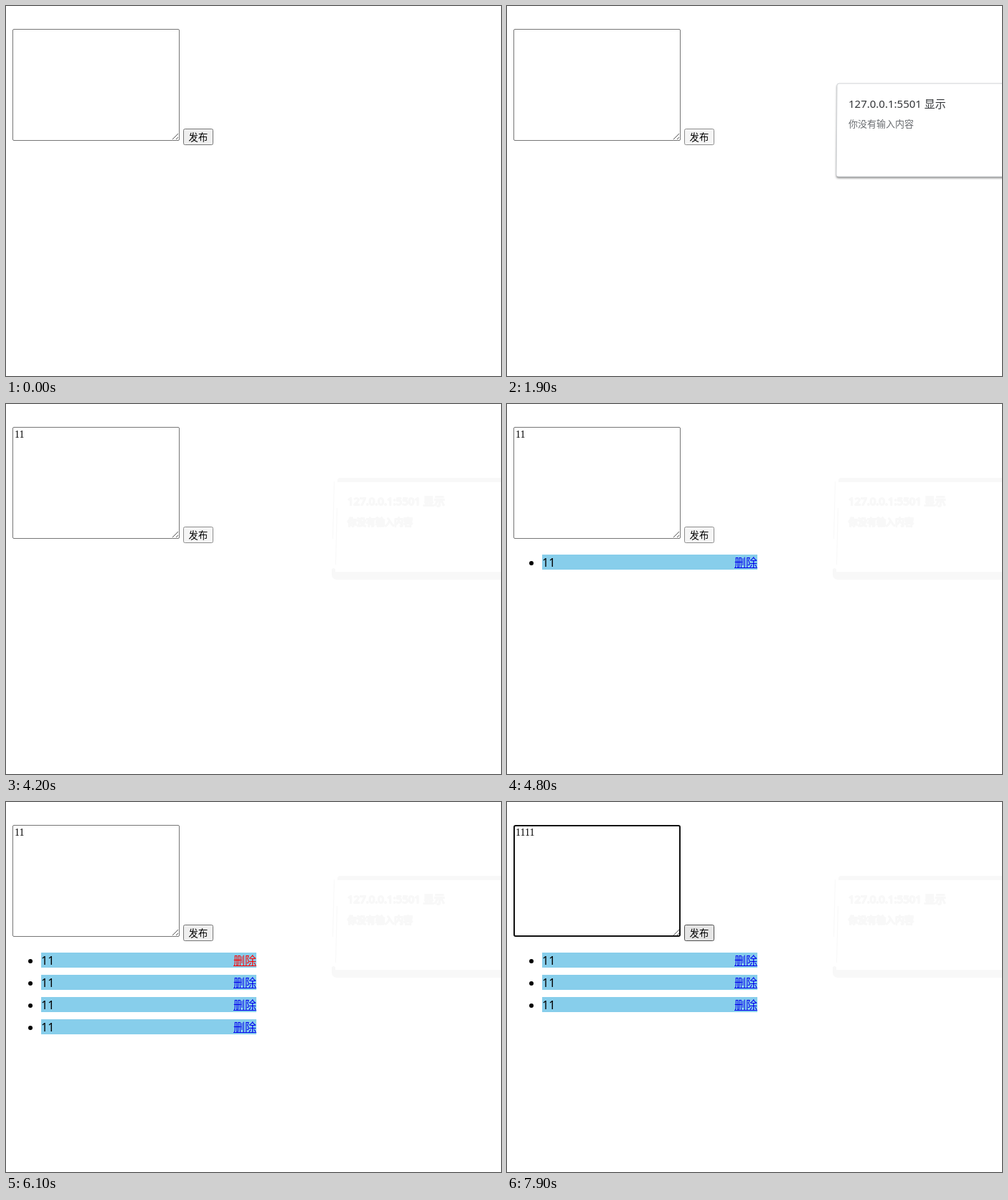
Write an HTML page with a canvas that moves like this. It is 690 by 516 pixels and loops after 8000 ms.

```html
<!DOCTYPE html>
<html lang="zh-CN">
<head>
<meta charset="utf-8">
<style>
html, body { margin: 0; width: 100%; height: 100%; overflow: hidden; background: #fff; }
canvas { display: block; }
</style>
</head>
<body>
<canvas id="stage" width="690" height="516"></canvas>
<script>
const ctx = document.getElementById('stage').getContext('2d');
const LOOP = 8000;
const SANS = '"Noto Sans", "Noto Sans CJK SC", "Noto Sans CJK", sans-serif';
const CJK = '"Noto Sans CJK SC", "Noto Sans CJK", "Noto Sans", sans-serif';
const TITLE = '127.0.0.1:5501 显示';
const BODY = '你没有输入内容';

// Each track lists [start time, state].
const tracks = {
  button: [[0, 'normal'], [300, 'hover'], [600, 'pressed'], [2000, 'normal'],
    [3800, 'hover'], [4200, 'pressed'], [4300, 'hover'], [4800, 'pressed'],
    [4900, 'hover'], [5100, 'pressed'], [5300, 'hover'], [5400, 'pressed'],
    [5500, 'hover'], [5600, 'normal'], [6700, 'hover'], [6800, 'normal'], [7900, 'hover']],
  field: [[0, 'normal'], [2200, 'hover'], [2600, 'focus'], [4200, 'normal'],
    [6800, 'hover'], [7000, 'focus']],
  typed: [[0, 0], [3200, 1], [3300, 2], [7200, 3], [7300, 4]],
  caret: [[0, false], [2600, true], [3000, false], [3200, true], [3800, false],
    [7000, true], [7800, false]],
  items: [[0, 0], [4300, 1], [4900, 2], [5300, 3], [5500, 4], [6300, 3]],
  redLink: [[0, false], [6100, true], [6300, false]],
  dialog: [[0, 'none'], [800, 'opening'], [900, 'open'], [1900, 'closing'], [2000, 'none']]
};

const buttonLook = {
  normal: ['#efefef', '#767676'],
  hover: ['#e5e5e5', '#4f4f4f'],
  pressed: ['#f5f5f5', '#8d8d8d']
};

function at(name, t) {
  let state;
  for (const [start, value] of tracks[name]) if (t >= start) state = value;
  return state;
}

function text(str, x, y, font, color) {
  ctx.font = font;
  ctx.fillStyle = color;
  ctx.fillText(str, x, y);
}

function box(x, y, w, h, r, fill, stroke, width = 1) {
  ctx.beginPath();
  ctx.roundRect(x, y, w, h, r);
  if (fill) { ctx.fillStyle = fill; ctx.fill(); }
  if (stroke) { ctx.strokeStyle = stroke; ctx.lineWidth = width; ctx.stroke(); }
}

function line(x1, y1, x2, y2, color) {
  ctx.beginPath();
  ctx.moveTo(x1, y1);
  ctx.lineTo(x2, y2);
  ctx.strokeStyle = color;
  ctx.lineWidth = 1;
  ctx.stroke();
}

function drawField(state, count, caret) {
  if (state === 'focus') box(10, 33, 231, 154, 2, '#fff', '#101010', 2);
  else box(9.5, 32.5, 232, 155, 1.5, '#fff', state === 'hover' ? '#4f4f4f' : '#767676');
  line(232, 186, 240, 178, '#555');
  line(237, 186, 240, 183, '#555');
  text('1'.repeat(count), 12, 47, '14px "Liberation Serif", serif', '#000');
  if (caret) {
    ctx.fillStyle = '#000';
    ctx.fillRect(12 + count * 7, 36, 1, 13);
  }
}

function drawButton(state) {
  const [fill, edge] = buttonLook[state];
  box(247.5, 171.5, 41, 22, 2, fill, edge);
  text('发布', 254.6, 188, '13.333px ' + CJK, '#000');
}

function drawItem(i, red) {
  const y = 210 + i * 31;
  const color = red ? '#f00' : '#00e';
  ctx.fillStyle = '#000';
  ctx.beginPath();
  ctx.arc(34, y + 12, 3, 0, Math.PI * 2);
  ctx.fill();
  ctx.fillStyle = 'skyblue';
  ctx.fillRect(49, y, 300, 21);
  text('11', 49, y + 17, '16px ' + SANS, '#000');
  text('删除', 317, y + 17, '16px ' + CJK, color);
  ctx.fillRect(317, y + 18, 32, 1);
}

// Faint residue left behind by the closed dialog.
function drawResidue() {
  const tint = '#f8f8f8';
  box(462, 103, 240, 6, [4, 0, 0, 0], tint);
  box(454, 234, 250, 11, [0, 0, 0, 7], tint);
  box(454, 229, 5, 9, 2, tint);
  line(457.5, 108, 455.5, 188, tint);
  line(461.5, 145, 459.5, 224, tint);
  ctx.strokeStyle = tint;
  ctx.lineWidth = 2;
  ctx.lineJoin = 'round';
  for (const [str, y, size] of [[TITLE, 141, 15], [BODY, 169, 13]]) {
    text(str, 476, y, size + 'px ' + SANS, tint);
    ctx.strokeText(str, 476, y);
  }
}

function drawDialog(state) {
  const closing = state === 'closing';
  ctx.save();
  if (state === 'opening') ctx.globalAlpha = 0.5;
  ctx.shadowColor = closing ? 'rgba(0,0,0,.5)' : 'rgba(0,0,0,.35)';
  ctx.shadowBlur = closing ? 3 : 7;
  ctx.shadowOffsetY = 2;
  ctx.beginPath();
  ctx.moveTo(720, 108);
  ctx.lineTo(463, 108);
  ctx.quadraticCurveTo(460, 108, 460, 111);
  ctx.lineTo(459, 235);
  ctx.quadraticCurveTo(459, 238, 462, 238);
  ctx.lineTo(720, 238);
  ctx.closePath();
  ctx.fillStyle = '#fff';
  ctx.fill();
  ctx.shadowColor = 'transparent';
  if (closing) {
    ctx.strokeStyle = '#d0d3d6';
    ctx.lineWidth = 1;
    ctx.stroke();
  }
  text(TITLE, 476, 142, '15px ' + SANS, closing ? '#333538' : '#202124');
  text(BODY, 476, 169, '13px ' + CJK, closing ? '#6a6d71' : '#5f6368');
  ctx.restore();
}

function draw(now) {
  const t = now % LOOP;
  ctx.fillStyle = '#fff';
  ctx.fillRect(0, 0, 690, 516);
  drawField(at('field', t), at('typed', t), at('caret', t));
  drawButton(at('button', t));
  const count = at('items', t);
  for (let i = 0; i < count; i++) drawItem(i, i === 0 && at('redLink', t));
  const dialog = at('dialog', t);
  if (t >= 2000) drawResidue();
  if (dialog !== 'none') drawDialog(dialog);
}

let begin;
function tick(now) {
  begin ??= now;
  draw(Math.max(0, now - begin));
  requestAnimationFrame(tick);
}
draw(0);
requestAnimationFrame(tick);
</script>
</body>
</html>
```
